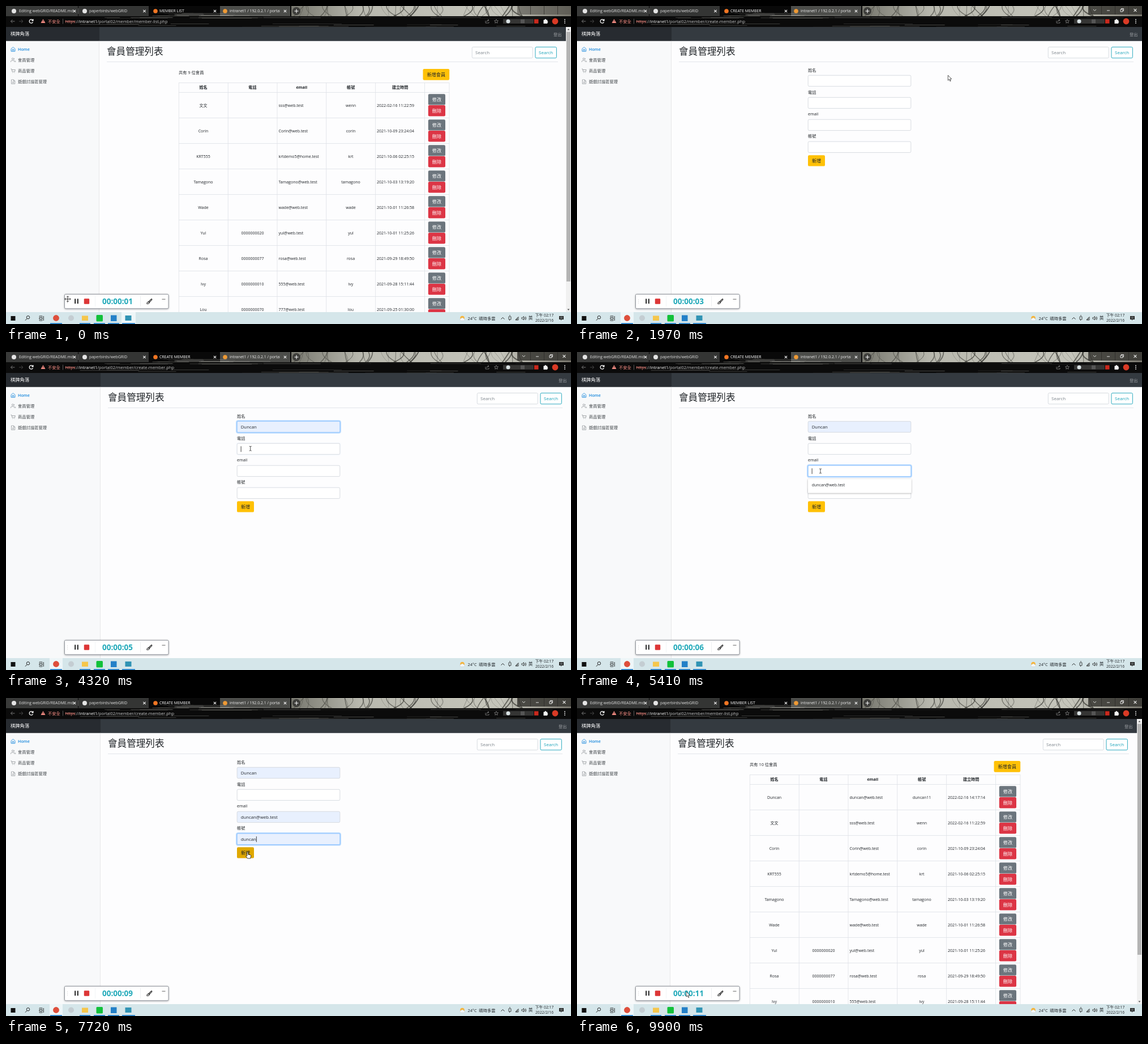
An HTML page that plays this animation: 998x561 px, repeating every 9940 ms.

```html
<!DOCTYPE html>
<html lang="zh-Hant">
<head>
<meta charset="utf-8">
<title>Member list</title>
<style>
html, body { margin: 0; width: 100%; height: 100%; overflow: hidden; background: #fdfdfe; }
svg { display: block; width: 100%; height: 100%; }
text { font-family: "Open Sans", "Noto Sans CJK TC", "Noto Sans CJK", "Noto Sans", sans-serif; white-space: pre; }
</style>
</head>
<body>
<svg id="stage" viewBox="0 0 998 561" xmlns="http://www.w3.org/2000/svg"></svg>
<script>
const LOOP = 9940;
const INK = '#212529', LINE = '#dee2e6', GRAY = '#6c757d';
const HOST = 'intranet1/portal02/member/';

// Markup helpers; text is placed by its vertical centre.
const text = (x, y, size, str, fill = INK, extra = '') =>
  `<text x="${x}" y="${y + size * .36}" font-size="${size}" fill="${fill}" ${extra}>${str}</text>`;
const mid = (x, y, size, str, fill, extra = '') => text(x, y, size, str, fill, `text-anchor="middle" ${extra}`);
const rect = (x, y, w, h, fill, extra = '') =>
  `<rect x="${x}" y="${y}" width="${w}" height="${h}" fill="${fill}" ${extra}/>`;
const dot = (x, y, r, fill) => `<circle cx="${x}" cy="${y}" r="${r}" fill="${fill}"/>`;
const path = (d, stroke, w = 1, extra = 'fill="none"') => `<path d="${d}" stroke="${stroke}" stroke-width="${w}" ${extra}/>`;
const group = (id, body, extra = '') => `<g id="${id}" ${extra}>${body}</g>`;
const button = (x, y, w, h, fill, label, color = '#fff', id = '') =>
  rect(x, y, w, h, fill, `rx="2.2" ${id && `id="${id}"`}`) + mid(x + w / 2, y + h / 2, 8.1, label, color);
const cross = (x, y, r, color) => path(`M${x - r} ${y - r}l${2 * r} ${2 * r}m0 ${-2 * r}l${-2 * r} ${2 * r}`, color, 1.1);

let seed = 11;
const random = () => (seed = (seed * 16807) % 2147483647) / 2147483647;
const times = (n, make) => Array.from({ length: n }, (_, i) => make(i)).join('');

function browserFrame() {
  const branches = times(46, () => {
    const x = 525 + random() * 400;
    return path(`M${x} 0q${random() * 16 - 8} 9 ${random() * 36 - 18} 18`, '#34342f', .4 + random() * 1.5,
      `fill="none" opacity="${.3 + random() * .5}"`);
  });
  const streaks = times(46, i => {
    const x = i < 14 ? 255 + random() * 90 : 120 + random() * 800;
    const y = i < 14 ? 12 + random() * 6 : (random() < .5 ? 18.5 + random() * 3 : 31 + random() * 6);
    return rect(x, y, 20 + random() * 110, .6, '#d8d8d0', `opacity="${.1 + random() * .4}"`);
  });
  const tab = (x, w, title, fill, id = '') =>
    `<svg x="${x + 20}" y="0" width="${w - 24}" height="18">` + text(3, 9, 6.9, title, fill, id && `id="${id}"`) + '</svg>';
  return rect(0, 0, 998, 37, '#0b0b0b') +
    rect(504, 0, 494, 18, 'url(#sky)') + branches +
    rect(0, 0, 127, 18, '#393a39') + rect(128, 0, 124, 18, '#343534') + rect(378, 0, 124, 18, '#4c4d4a') +
    rect(253, 0, 125, 18, '#090909') + streaks +
    rect(127.5, 4, .7, 10, '#777') +
    dot(14, 9, 4, '#e4e4e4') + dot(139, 9, 4, '#e4e4e4') + group('tabIcon', dot(264, 9, 3.8, '#f37623')) + dot(387, 9, 3.8, '#ef9a35') +
    tab(0, 128, 'Editing webGRID/README.md', '#e0e0e0') + tab(124, 116, 'paperbirds/webGRID', '#e0e0e0') +
    tab(248, 118, '', '#fff', 'tabTitle') + tab(372, 116, 'intranet1 / 192.0.2.1 / portal02', '#eee') +
    [121, 244.5, 369, 493].map(x => cross(x, 9, 2.2, '#f2f2f2')).join('') +
    dot(513, 9, 7, '#3d3d3a') + path('M509.5 9h7m-3.5-3.5v7', '#fff', 1.1) +
    rect(903, 0, 95, 15, '#4d4b45', 'opacity=".55"') + path('M926.5 0v15M950.5 0v15M974.5 0v15', '#33322e', .8) +
    group('controls', rect(903, 0, 95, 15, '#252522', 'opacity=".55"') +
      path('M912 6l2.5 2.5L917 6M936 8h5M960 6h4v4h-4zm1.5 0v-1.5h4v4H964', '#f2f2f2', .9) + cross(986, 7.5, 2.4, '#f2f2f2')) +
    path('M15.500 27h-7m3-3l-3 3 3 3', '#777', 1) + path('M23 27h7m-3-3l3 3-3 3', '#444', 1) +
    group('reload', path('M47.300 25.200a3.300 3.300 0 1 0 .2 3M48 23v2.800h-2.800', '#fff', 1.2)) +
    group('stop', cross(45, 27, 2.8, '#fff')) +
    '<path d="M65.500 23l4 7h-8z" fill="#f28b82"/>' + rect(65.1, 25.3, .8, 2.4, '#111') +
    text(74, 27, 7.3, '不安全', '#f28b82') + rect(100, 22.5, .7, 9, '#777') +
    text(104.5, 27, 7.4, '', '#c9cacb', 'id="address"') +
    path('M847 26v4h6v-2m-4 0q0-3 4-3m-2-1.500l2 1.500-2 1.500', '#888', .8) +
    '<path d="M866 23.500l1 2.300 2.500.2-1.900 1.700.6 2.500-2.200-1.400-2.200 1.400.6-2.500-1.900-1.700 2.500-.2z" fill="none" stroke="#999" stroke-width=".7"/>' +
    rect(878, 23, 54, 8, '#858580', 'opacity=".35"') + dot(887, 27, 3.5, '#d9e2e4') + rect(909, 23.5, 7, 7, '#555') +
    rect(933, 23.3, 7.5, 7.5, '#c9291d', 'id="redTool"') +
    '<path d="M949.500 24.500h2a1.400 1.400 0 0 1 2.800 0h2v2.300a1.400 1.400 0 0 1 0 2.700v1.500h-6.800z" fill="#f5f5f5"/>' +
    dot(970, 27, 5.4, '#d93a25') + [24, 27, 30].map(y => dot(987, y, .9, '#eee')).join('');
}

// Parts shared by both pages; dx is the shift caused by the missing scrollbar.
function pageShell(dx, width) {
  const side = dx ? 167 : 165;
  const x = dx ? 180 : 178;
  return rect(0, 37, width, 503, '#fdfdfe') + rect(0, 37, width, 24.8, '#343a40') + rect(0, 37, side, 24.8, '#272b30') +
    text(8, 49.5, 8.3, '棋牌角落', '#fff') + text(967 + dx, 50, 7.2, '登出', '#9a9da0') +
    rect(0, 61.8, side, 478.2, '#f8f9fa') + rect(side - .8, 61.8, .8, 478.2, '#e3e4e5') +
    text(x, 80.5, 16.6, '會員管理列表', INK, 'font-weight="300"') + rect(x, 98, 797 + (dx ? 6 : 0), .8, LINE) +
    rect(823.3 + dx, 72.4, 107, 19.4, '#fff', 'rx="2" stroke="#ced4da" stroke-width=".8"') +
    text(829 + dx, 82.5, 8, 'Search', '#7b838a') +
    rect(935 + dx, 72.4, 37.4, 19.4, '#fff', 'rx="2" stroke="#17a2b8" stroke-width=".9"') +
    mid(953.7 + dx, 82.5, 8, 'Search', '#17a2b8');
}

const sideMenu = () => group('menuText',
    text(21, 76, 7.2, 'Home', '#1687dc', 'font-weight="600"') +
    ['會員管理', '商品管理', '遊戲討論區管理'].map((s, i) => text(21, 95 + 19.2 * i, 7.3, s, '#42474b')).join('')) +
  group('menuIcons',
    path('M9 75.500l3.500-3 3.500 3v4.500H9zm2.300 4.500v-3.500h2.400v3.500', '#1687dc', .8) +
    path('M8.500 99v-1q0-1.800 2-1.800h2.500q2 0 2 1.800v1M10.300 93.300a1.500 1.500 0 1 0 3 0a1.500 1.500 0 1 0-3 0M16.700 99v-1q0-1.300-1.200-1.700M14 91.900q1.300.4 0 2.800', '#8b9094', .7) +
    path('M8.500 111h1.400l1.200 5h4.300l.9-3.600h-6M11.300 117.800h.6m2.800 0h.6', '#8b9094', .8) +
    path('M9.500 130h4l2.300 2.300v5H9.500zm4 0v2.300h2.300M11 133.800h3.300M11 135.500h3.300', '#8b9094', .7));

const members = [
  ['Duncan', '', 'duncan@web.test', 'duncan11', '2022-02-16 14:17:14'],
  ['文文', '', 'sss@web.test', 'wenn', '2022-02-16 11:22:59'],
  ['Corin', '', 'Corin@web.test', 'corin', '2021-10-09 23:24:04'],
  ['KRT555', '', 'krtdemo5@home.test', 'krt', '2021-10-06 02:25:15'],
  ['Tamagono', '', 'Tamagono@web.test', 'tamagono', '2021-10-03 13:19:20'],
  ['Wade', '', 'wade@web.test', 'wade', '2021-10-01 11:26:58'],
  ['Yul', '0000000020', 'yul@web.test', 'yul', '2021-10-01 11:25:26'],
  ['Rosa', '0000000077', 'rosa@web.test', 'rosa', '2021-09-29 18:49:50'],
  ['Ivy', '0000000010', '555@web.test', 'ivy', '2021-09-28 15:11:44'],
  ['Lou', '0000000070', '777@web.test', 'lou', '2021-09-25 01:30:00'],
];
const columns = [305.3, 392.2, 479, 565.8, 652.7, 739.5, 783];

function memberRow([name, phone, email, account, date], i) {
  const y = 152.3 + 45 * i, c = y + 22.8;
  return rect(305, y + 44.9, 478, .8, LINE) +
    mid(348.5, c, 7, name) + mid(435.5, c, 7, phone) + text(481.5, c, 7, email) + mid(609, c, 7, account) + text(655, c, 7, date) +
    button(745.8, y + 2.9, 30.2, 19.4, GRAY, '修改') + button(745.8, y + 22.8, 30.2, 19.4, '#dc3545', '刪除');
}

function listPage() {
  return pageShell(0, 998) + text(305, 117, 7.3, '', INK, 'id="count"') +
    button(736.5, 111, 46.7, 19.8, '#ffc107', '新增會員', INK, 'addButton') +
    rect(305, 135, 478, .8, LINE) + rect(305, 152, 478, .8, LINE) +
    ['姓名', '電話', 'email', '帳號', '建立時間'].map((s, i) => mid(348.5 + 86.9 * i, 143.8, 7.1, s, INK, 'font-weight="700"')).join('') +
    columns.map(x => rect(x - .4, 135, .8, 405, LINE)).join('') +
    group('newRow', memberRow(members[0], 0)) + group('oldRows', members.slice(1).map((m, i) => memberRow(m, i + 1)).join('')) +
    rect(989, 37, 9, 503, '#f1f1f1') + rect(990, 45.5, 7, 440, '#b4b4b4', 'id="thumb"') +
    '<path d="M991.500 42.500l2-2.500 2 2.500zM991.500 534.500l2 2.500 2-2.500z" fill="#555"/>';
}

const fields = [
  { label: '姓名', focus: 2500, blur: 4310, open: 2620, close: 3560, options: ['海島商人', '搗蛋蜥蜴', '水車工坊', 'Duncan'], pick: 'Duncan' },
  { label: '電話', focus: 4310, blur: 5200, open: Infinity, close: Infinity, options: [], pick: '' },
  { label: 'email', focus: 5200, blur: 6510, open: 5350, close: 6200, options: ['duncan@web.test'], pick: 'duncan@web.test' },
  { label: '帳號', focus: 6510, blur: 8500, open: 6650, close: 7560, options: ['duncan'], pick: 'duncan' },
];
const fieldTop = i => 122.3 + 38.95 * i;
const ITEM = 18.7;

function formPage() {
  const inputs = fields.map(({ label }, i) => {
    const y = fieldTop(i);
    return text(408, y - 9.3, 7.2, label) +
      rect(407.2, y - .9, 183.6, 21.2, 'none', `rx="2.8" stroke="#80bdff" stroke-opacity=".6" stroke-width="2.2" id="ring${i}"`) +
      rect(408.2, y, 181.6, 19.4, '#fff', `rx="2" stroke="#ced4da" stroke-width=".8" id="box${i}"`) +
      text(414.7, y + 10.3, 7.8, '', INK, `id="value${i}"`) + rect(414.7, y + 5, .8, 10, '#111', `id="caret${i}"`);
  }).join('');
  const menus = fields.map(({ options }, i) => {
    const y = fieldTop(i) + 24;
    return group('menu' + i, rect(408, y, 182.5, options.length * ITEM + 5.6, '#fff', 'filter="url(#shadow)"') +
      rect(408, y + .8, 182.5, ITEM, '#e8e8e5', `id="hover${i}"`) +
      options.map((s, k) => text(414.7, y + 9.8 + ITEM * k, 7, s)).join(''));
  }).join('');
  return pageShell(9, 998) + inputs + path('', '#e03a3a', .8, 'fill="none" id="spelling"') +
    button(408, 263.2, 30, 19.4, '#ffc107', '新增', INK, 'saveButton') + menus;
}

function taskbar() {
  const underline = [[78, 21], [130, 19], [155, 20], [180, 20], [205, 23]];
  return rect(0, 540, 998, 21, '#d5e6ea') +
    rect(77, 540, 23, 21, '#eef6f8', 'id="browserActive"') + rect(204, 540, 25, 21, '#eef6f8', 'id="recorderActive"') +
    underline.map(([x, w]) => rect(x, 559.4, w, 1.6, '#1679ca')).join('') +
    rect(8.5, 547, 8, 8, '#111') + path('M36.300 549.300a2.700 2.700 0 1 1 5.400 0a2.700 2.700 0 1 1-5.400 0M37 551.500l-3 3.200', '#222', 1) +
    path('M59 548v-1h5v1M59 549.500h5v3h-5zM59 554v1h5v-1M66.300 547v8', '#222', .9) +
    dot(88.5, 550.5, 5.4, '#de4f3c') + dot(115, 550.5, 5, '#c4cdd2') + rect(134, 546.5, 11, 8.5, '#f5c64c') +
    rect(159.5, 545, 11.5, 11.5, '#12c13a', 'rx="1.500"') + rect(185, 545.5, 10.5, 10.5, '#2380c8') + rect(210.5, 546, 11, 9, '#3193b4') +
    dot(806, 550.5, 3.8, '#f6b53b') + '<path d="M803 555a2.200 2.200 0 0 1 1-4a3 3 0 0 1 5 1a1.600 1.600 0 0 1 0 3z" fill="#f5f8fa" stroke="#aab" stroke-width=".3"/>' +
    text(815.5, 551, 7.3, '24°C  晴時多雲') + path('M874.500 552.500l3-3 3 3', '#222', 1) +
    path('M888 548h4v5h-4zm1-2h2m-1.500 7v2M900 554l5-5.500v5.500zM901 554v-2m2 2v-4M911 549.500h1.500l2-2v6.500l-2-2H911zm5-.5q1.500 2 0 3.800m1.500-5q2.500 3 0 6.200', '#222', .8) +
    mid(926.5, 550.5, 7.6, '英') + mid(951, 545.8, 6.8, '下午 02:17') + mid(951, 555, 6.8, '2022/2/16') +
    '<path d="M977 547h8v6h-3.500l-1.500 2v-2h-3z" fill="#222"/>' + path('M978.500 549h5m-5 2h5', '#d5e6ea', .6);
}

const recorder = () => rect(103.5, 508.5, 183.5, 25.3, '#fff', 'rx="2" stroke="#858a91" stroke-width=".9" filter="url(#shadow)"') +
  times(3, i => dot(108.5, 518 + i * 3, .5, '#bbb')) +
  rect(121.2, 516.5, 2, 8.6, '#222') + rect(125.8, 516.5, 2, 8.6, '#222') + rect(137.8, 516.3, 9.4, 9.4, '#dd3636', 'rx="1.300"') +
  rect(157, 512, .6, 18, '#eceef0') + rect(237, 512, .6, 18, '#e2e5e8') +
  mid(197, 521.3, 13.5, '', '#20a9b9', 'id="clock" font-weight="700"') +
  path('M252 521.500l4.500-4.500q1.500-.5 1.300 1l-4.300 4.700zM249 525.500q0-4 3-3.500q2 2-.5 3.300z', '#222', 1.1) + rect(275.5, 516.8, 6, .9, '#555');

// Pointers are drawn with their hot spot at the origin.
const pointers = () => group('pointer',
  group('arrow', '<path d="M0 0v9l2.200-1.800 1.500 3.300 1.300-.6-1.500-3.200 2.900-.2z" fill="#fff" stroke="#111" stroke-width=".7"/>') +
  group('hand', '<path d="M-1.200 1q1-1.600 2 0v3.500l4 .9q1.200.4.9 1.800l-.9 4.300h-5.300l-3-4.300q.2-1.400 2.300.1z" fill="#fff" stroke="#111" stroke-width=".8"/>') +
  group('text', path('M-2-4q2 0 2 .8q0-.8 2-.8M0-3.500v7M-2 4q2 0 2-.8q0 .8 2 .8', '#222', .8)) +
  group('move', path('M-5 0h10M0-5v10M-3.500-1.800l-1.800 1.800 1.800 1.800M3.500-1.800l1.800 1.800-1.800 1.800M-1.800-3.500l1.800-1.800 1.800 1.800M-1.800 3.500l1.800 1.800 1.800-1.800', '#333', 1)));

stage.innerHTML = `<defs>
  <linearGradient id="sky"><stop offset="0" stop-color="#77776e"/><stop offset=".25" stop-color="#b9b9af"/>
  <stop offset=".75" stop-color="#c5c5bb"/><stop offset="1" stop-color="#77756c"/></linearGradient>
  <filter id="shadow" x="-10%" y="-20%" width="120%" height="150%"><feDropShadow dx="0" dy=".8" stdDeviation="1.400" flood-opacity=".35"/></filter>
</defs>` + browserFrame() + group('list', listPage()) + group('form', formPage()) + sideMenu() +
  group('status', rect(0, 530, 170, 10, '#3b3d40') + text(2, 535, 6.7, `https://${HOST}create-member.php`, '#e8e8e8')) +
  taskbar() + recorder() + pointers();

const $ = id => document.getElementById(id);
const show = (id, on) => $(id).setAttribute('display', on ? 'inline' : 'none');
const set = (id, name, value) => $(id).setAttribute(name, value);
const write = (id, str) => { if ($(id).textContent !== str) $(id).textContent = str; };
const clamp = v => Math.max(0, Math.min(1, v));
const between = (t, a, b) => t >= a && t < b;

// time, x, y, pointer shape from that time on
const route = [
  [0, 109, 517, 'move'], [460, 109, 517, 'arrow'], [1250, 755, 117, 'hand'], [1700, 755, 117, 'arrow'],
  [2380, 470, 132, 'text'], [2620, 470, 132, 'arrow'], [2880, 441.8, 153.5, 'arrow'], [3060, 441.8, 153.5, 'arrow'],
  [3360, 432, 211, 'arrow'], [3620, 432, 211, 'arrow'], [4000, 431.7, 170.3, 'text'], [4700, 431.7, 170.3, 'text'],
  [4950, 430, 210, 'text'], [5640, 430, 210, 'arrow'], [5790, 427, 237, 'arrow'], [6100, 427, 237, 'arrow'],
  [6280, 425.6, 247.8, 'text'], [6950, 425.6, 247.8, 'arrow'], [7130, 426, 271, 'arrow'], [7560, 427, 271.5, 'hand'],
  [8900, 427.5, 271.5, 'arrow'], [9820, 193, 518, 'arrow'], [LOOP, 193, 518, 'arrow'],
];

function pointerAt(t) {
  const i = route.findIndex((p, k) => k && t < p[0]);
  const [t0, x0, y0, shape] = route[i - 1], [t1, x1, y1] = route[i];
  const u = (t - t0) / (t1 - t0), e = u * u * (3 - 2 * u);
  return { x: x0 + (x1 - x0) * e, y: y0 + (y1 - y0) * e, shape };
}

function drawField(f, i, t, pointer) {
  const y = fieldTop(i), isOpen = between(t, f.open, f.close);
  const row = Math.floor((pointer.y - y - 24.8) / ITEM);
  const hovered = isOpen && row >= 0 && row < f.options.length;
  let value = hovered ? f.options[row] : t >= f.close ? f.pick : '';
  const extraDigits = i === 3 ? (t >= 7950) + (t >= 8180) : 0;
  value += '1'.repeat(extraDigits);
  const ring = clamp((t - f.focus) / 150) - clamp((t - f.blur) / 150);

  write('value' + i, value);
  set('value' + i, 'font-size', isOpen ? 7 : 7.8);
  set('ring' + i, 'opacity', ring);
  set('box' + i, 'stroke', ring > .5 ? '#80bdff' : '#ced4da');
  set('box' + i, 'fill', value && !extraDigits ? '#e8f0fe' : '#fff');
  show('menu' + i, isOpen);
  show('hover' + i, hovered);
  set('hover' + i, 'y', y + 24.8 + ITEM * row);

  const since = t - (t >= f.close ? f.close : f.focus);
  const width = value && !isOpen ? $('value' + i).getComputedTextLength() : 0;
  show('caret' + i, between(t, f.focus, f.blur) && since % 1060 < 530);
  set('caret' + i, 'x', 414.7 + width);
}

function draw(t) {
  const onForm = between(t, 1650, 8510), added = t >= 8510;
  const loading = between(t, 1650, 1950) || between(t, 8510, 8850);
  const file = onForm ? 'create-member.php' : 'member-list.php';
  const active = t >= 1470;
  const pointer = pointerAt(t);

  show('form', onForm);
  show('list', !onForm);
  show('newRow', added);
  set('oldRows', 'transform', `translate(0 ${added ? 0 : -45})`);
  set('thumb', 'height', added ? 407.5 : 440.5);
  write('count', `共有 ${added ? 10 : 9} 位會員`);
  set('addButton', 'fill', between(t, 1230, 1650) ? '#e0a800' : '#ffc107');
  set('saveButton', 'fill', t >= 7560 ? '#e0a800' : '#ffc107');
  show('status', between(t, 1300, 1650));

  write('tabTitle', loading ? `https://${HOST}${file}` : onForm ? 'CREATE MEMBER' : 'MEMBER LIST');
  if ($('address').dataset.file !== file) {
    $('address').dataset.file = file;
    $('address').innerHTML = `<tspan fill="#f28b82" text-decoration="line-through">https</tspan>://<tspan fill="#fff">${HOST.split('/')[0]}</tspan>/${HOST.split('/').slice(1).join('/')}${file}`;
  }
  show('tabIcon', !loading);
  show('reload', !loading);
  show('stop', loading);
  set('redTool', 'fill', loading ? '#666' : '#c9291d');
  show('controls', active);
  show('browserActive', active);
  show('recorderActive', !active);
  show('menuIcons', !loading);
  set('menuText', 'transform', `translate(${loading ? -12.5 : 0} 0)`);

  if (onForm) {
    fields.forEach((f, i) => drawField(f, i, t, pointer));
    const marked = between(t, fields[2].close, fields[2].blur);
    show('spelling', marked);
    if (marked) set('spelling', 'd', `M414.700 215.300h${$('value2').getSubStringLength(0, 6)}`);
  }

  write('clock', '00:00:' + String(Math.floor((t + 1540) / 1000)).padStart(2, '0'));
  set('pointer', 'transform', `translate(${pointer.x} ${pointer.y})`);
  ['arrow', 'hand', 'text', 'move'].forEach(s => show(s, s === pointer.shape));
}

const start = performance.now();
function tick() {
  draw((performance.now() - start) % LOOP);
  requestAnimationFrame(tick);
}
tick();
</script>
</body>
</html>
```
